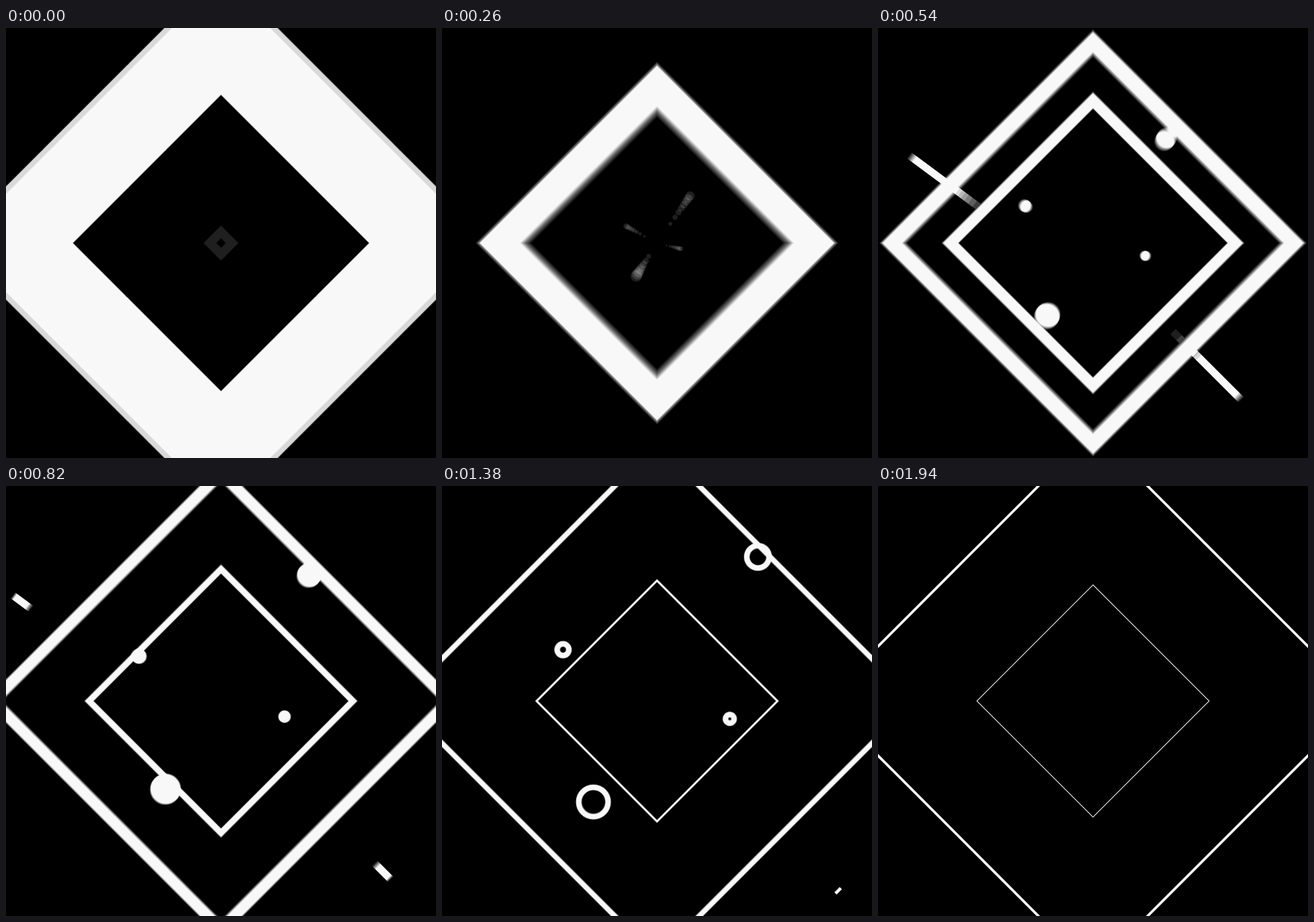
Write an HTML page without scripts that moves like this. It is 748 by 748 pixels and loops after 2040 ms.

```html
<!DOCTYPE html>
<html lang="en">
<head>
<meta charset="utf-8">
<title>Diamond burst</title>
<style>
@property --w { syntax: "<length>"; inherits: true; initial-value: 40px; }
@property --head { syntax: "<length>"; inherits: true; initial-value: 0px; }
@property --tail { syntax: "<length>"; inherits: true; initial-value: 0px; }

:root {
  --loop: 2040ms;
  --burst: cubic-bezier(0, .61, .2, 1);
  --glide: cubic-bezier(.33, .43, .67, .75);
}
html, body { margin: 0; width: 100%; height: 100%; overflow: hidden; background: #000; }
svg { display: block; width: 100vw; height: 100vh; background: #000; isolation: isolate; }
path, circle { fill: none; stroke: #fff; }

/* Motion blur: eight exposures, 5 ms apart, added together */
.live { animation: live var(--loop) step-end infinite; }
.live > g { opacity: .125; mix-blend-mode: plus-lighter; --d: 0ms; }
.live > g:nth-child(2) { --d: 5ms; }
.live > g:nth-child(3) { --d: 10ms; }
.live > g:nth-child(4) { --d: 15ms; }
.live > g:nth-child(5) { --d: 20ms; }
.live > g:nth-child(6) { --d: 25ms; }
.live > g:nth-child(7) { --d: 30ms; }
.live > g:nth-child(8) { --d: 35ms; }
.rest { animation: rest var(--loop) step-end infinite; }

.outer { d: path("M0 -469L469 0L0 469L-469 0Z"); stroke-width: 4.4px; }
.inner { d: path("M0 -202L202 0L0 202L-202 0Z"); stroke-width: 1.2px; }
.live .outer { animation: outer var(--loop) var(--d) var(--glide) infinite both; }
.live .inner { animation: inner var(--loop) var(--d) var(--glide) infinite both; }

circle {
  r: calc(var(--r) - min(var(--w), var(--r)) / 2);
  stroke-width: min(var(--w), var(--r));
  animation: grow var(--loop) var(--d) var(--burst) infinite both, thin var(--loop) var(--d) linear infinite both;
}
.c1 { cx: 181px; cy: -258.5px; --r: 25px; }
.c2 { cx: -114px; cy: 181px; --r: 31.3px; }
.c3 { cx: -168.5px; cy: -92px; --r: 15.5px; }
.c4 { cx: 130.5px; cy: 32px; --r: 12.7px; }

.bar1, .bar2 {
  stroke-width: 13px;
  stroke-dasharray: 0px var(--tail) calc(var(--head) - var(--tail)) 999px;
  animation: head var(--loop) var(--d) var(--burst) infinite both, tail var(--loop) var(--d) var(--burst) infinite both;
}
.bar1 { d: path("M-147 -24.5L-388 -203"); }
.bar2 { d: path("M106 121L318 333"); }

@keyframes live { 0% { visibility: visible; } 96%, 100% { visibility: hidden; } }
@keyframes rest { 0% { visibility: hidden; } 96%, 100% { visibility: visible; } }

@keyframes outer {
  0% { transform: scale(0); stroke-width: 400px; animation-timing-function: cubic-bezier(0, .5, .6, .83); }
  11.9% { transform: scale(.576); stroke-width: 98px; }
  25.6% { transform: scale(.742); stroke-width: 38px; }
  39.4% { transform: scale(.846); stroke-width: 24px; }
  53.1% { transform: scale(.91); stroke-width: 14px; }
  66.8% { transform: scale(.954); stroke-width: 9.6px; animation-timing-function: cubic-bezier(.33, .5, .67, 1); }
  94.3%, 97.9% { transform: scale(1); stroke-width: 4.4px; }
  98%, 100% { transform: scale(0); stroke-width: 400px; }
}
@keyframes inner {
  0% { transform: scale(1.807); stroke-width: 84.1px; animation-timing-function: cubic-bezier(0, .5, .6, .83); }
  11.9% { transform: scale(1.386); stroke-width: 25.5px; }
  25.6% { transform: scale(1.228); stroke-width: 16.1px; }
  39.4% { transform: scale(1.136); stroke-width: 9.6px; }
  53.1% { transform: scale(1.082); stroke-width: 5.9px; }
  66.8% { transform: scale(1.037); stroke-width: 3.4px; animation-timing-function: cubic-bezier(.33, .5, .67, 1); }
  94.3%, 97.9% { transform: scale(1); stroke-width: 1.2px; }
  98%, 100% { transform: scale(1.807); stroke-width: 84.1px; }
}
@keyframes grow {
  0%, 10.8% { transform: scale(0); }
  96%, 97.9% { transform: scale(1); }
  98%, 100% { transform: scale(0); }
}
@keyframes thin {
  0%, 36% { --w: 40px; }
  39.4% { --w: 35px; }
  53.1% { --w: 20px; }
  66.8% { --w: 10px; }
  81% { --w: 3.5px; }
  92%, 97.9% { --w: 0px; }
  98%, 100% { --w: 40px; }
}
@keyframes head {
  0%, 15% { --head: 0px; }
  76%, 97.9% { --head: 300px; }
  98%, 100% { --head: 0px; }
}
@keyframes tail {
  0%, 24.5% { --tail: 0px; }
  85.5%, 97.9% { --tail: 300px; }
  98%, 100% { --tail: 0px; }
}
</style>
</head>
<body>
<svg viewBox="-374 -374 748 748">
  <g class="live">
    <g><path class="outer"/><path class="inner"/><path class="bar1"/><path class="bar2"/><circle class="c1"/><circle class="c2"/><circle class="c3"/><circle class="c4"/></g>
    <g><path class="outer"/><path class="inner"/><path class="bar1"/><path class="bar2"/><circle class="c1"/><circle class="c2"/><circle class="c3"/><circle class="c4"/></g>
    <g><path class="outer"/><path class="inner"/><path class="bar1"/><path class="bar2"/><circle class="c1"/><circle class="c2"/><circle class="c3"/><circle class="c4"/></g>
    <g><path class="outer"/><path class="inner"/><path class="bar1"/><path class="bar2"/><circle class="c1"/><circle class="c2"/><circle class="c3"/><circle class="c4"/></g>
    <g><path class="outer"/><path class="inner"/><path class="bar1"/><path class="bar2"/><circle class="c1"/><circle class="c2"/><circle class="c3"/><circle class="c4"/></g>
    <g><path class="outer"/><path class="inner"/><path class="bar1"/><path class="bar2"/><circle class="c1"/><circle class="c2"/><circle class="c3"/><circle class="c4"/></g>
    <g><path class="outer"/><path class="inner"/><path class="bar1"/><path class="bar2"/><circle class="c1"/><circle class="c2"/><circle class="c3"/><circle class="c4"/></g>
    <g><path class="outer"/><path class="inner"/><path class="bar1"/><path class="bar2"/><circle class="c1"/><circle class="c2"/><circle class="c3"/><circle class="c4"/></g>
  </g>
  <g class="rest"><path class="outer"/><path class="inner"/></g>
</svg>
</body>
</html>
```
